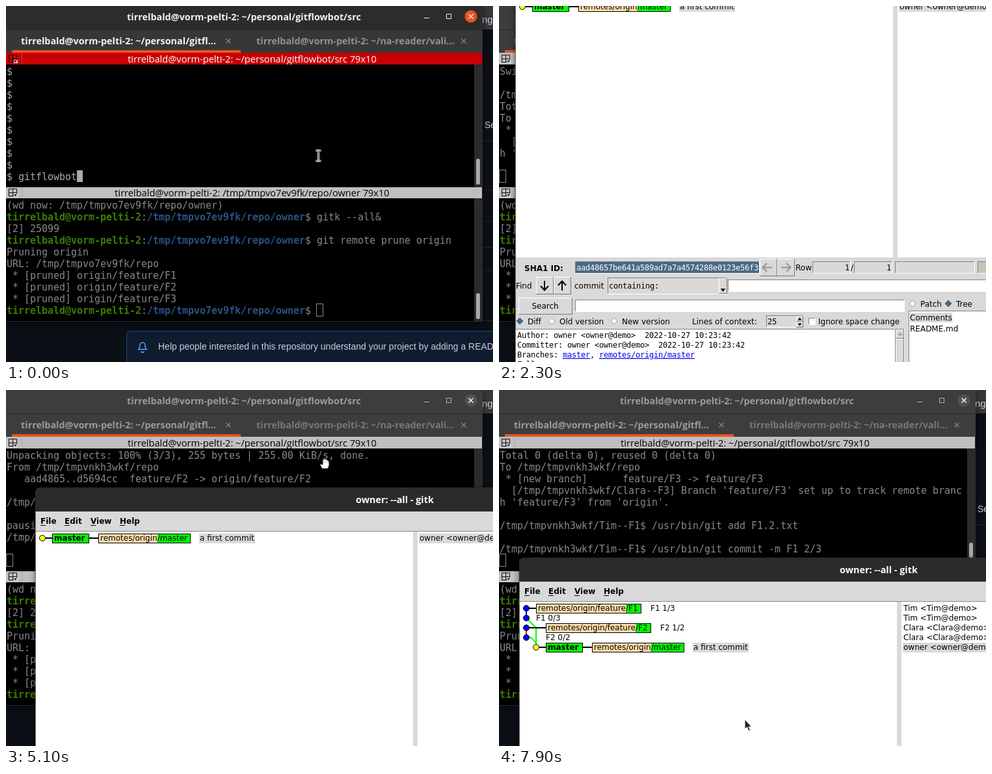
An HTML page for the animation above (8 s loop, 749 by 548 pixels).

```html
<!DOCTYPE html>
<html lang="en">
<head>
<meta charset="utf-8">
<title>Terminal and commit viewer</title>
<style>
html, body { margin: 0; width: 100%; height: 100%; overflow: hidden; background: #0b0f16; }
svg { display: block; }
text { white-space: pre; }
.mono { font: 15px "DejaVu Sans Mono", monospace; letter-spacing: -.0308px; fill: #888; }
.bar { font: 14.6px "Open Sans", sans-serif; text-anchor: middle; }
.cap { font: 700 14.4px "Open Sans", sans-serif; fill: #f2f2f0; }
.mid { text-anchor: middle; }
.web { font: 14px "Liberation Sans", Arial, sans-serif; fill: #c9d1d9; }
.ui { font: 12px "DejaVu Sans", sans-serif; fill: #000; }
.code { font: 12px "DejaVu Sans Mono", monospace; letter-spacing: -.224px; fill: #000; }
.b { font-weight: 700; }
.link { fill: #00e; text-decoration: underline; }
.shade { filter: drop-shadow(0 2px 5px rgba(0, 0, 0, .55)); }
#head { fill: #2c2c2c; }
#tabs { fill: #373737; }
#quit { fill: #e95420; }
.sign { stroke: #f2f2f0; fill: none; }
.off #head, .off #tabs { fill: #3d3d3d; }
.off #quit { fill: #515151; }
.off .cap { fill: #9b9b99; }
.cap.dim { fill: #929290; }
.off .cap.dim { fill: #787876; }
.off .sign { stroke: #b5b5b3; }
.off .sign.x { stroke: #fff; }
#topbar { fill: #c0bebf; }
.live #topbar { fill: #c80003; }
.live #topname { fill: #fff; }
.live .top { fill: #aaa; }
</style>
</head>
<body>
<svg id="stage" width="749" height="548" viewBox="0 0 749 548"></svg>
<script>
const USER = 'tirrelbald@vorm-pelti-2', BOSS = 'owner';
const GREY = '#d9d9d9', GREEN = '#00ff00', TAN = '#ffddaa', BLUE = '#0000ff';
const ROW = 18, TOP = 106, LOW = 312; // line height and first baselines

// Drawing helpers
const rect = (x, y, w, h, fill, more = '') =>
  `<rect x="${x}" y="${y}" width="${w}" height="${h}" fill="${fill}" ${more}/>`;
const text = (x, y, s, cls, more = '') =>
  `<text x="${x}" y="${y}" class="${cls}" ${more}>${s.replace(/</g, '&lt;')}</text>`;
const path = (d, stroke, width = 1, fill = 'none') =>
  `<path d="${d}" stroke="${stroke}" stroke-width="${width}" fill="${fill}"/>`;
const bevel = (x, y, w, h, lit, dark, fill) =>
  rect(x, y, w, h, dark) + rect(x, y, w - 1, h - 1, lit) + rect(x + 1, y + 1, w - 2, h - 2, fill);
const raised = (x, y, w, h) => bevel(x, y, w, h, '#fff', '#777', GREY);
const sunken = (x, y, w, h, fill = GREY) => bevel(x, y, w, h, '#828282', '#fff', fill);
const group = (id, body, more = '') => `<g id="${id}" ${more}>${body}</g>`;

function page() {
  const lines = [207, 283, 331, 371, 407, 484].map(y => rect(733, y, 16, 1, '#21262d')).join('');
  return rect(0, 0, 749, 548, '#0b0f16') + rect(733, 0, 16, 36, '#38383a') +
    rect(733, 95, 16, 390, '#0d1117') + lines +
    text(732, 26, 'ng', 'web', 'style="font-size:15px"') + text(736, 188, 'Se', 'web') +
    rect(185.5, 500.5, 600, 80, '#0f1c30', 'stroke="#1f4374" rx="5"') +
    path('M204 528.5c2-2 2-4 2-6a4 4.5 0 0 1 8 0c0 2 0 4 2 6zM208 531.5a2 2 0 0 0 4 0', '#58a6ff', 1.5) +
    text(234, 529, 'Help people interested in this repository understand your project by adding a README', 'web');
}

const paneIcon = y => path(`M4.5 ${y + 3.5}h12v11h-12zM10.5 ${y + 3.5}v11M4.5 ${y + 9.5}h12`, '#111') +
  rect(12, y + 11, 6, 5, '#ddd') + path(`M12 ${y + 12}h5l-2.5 3z`, 'none', 0, '#111') +
  rect(24, y + 1, 1, 16, '#999', 'opacity=".5"');

function prompt(row, cmd) {
  const span = (s, c) => `<tspan class="b" fill="${c}">${s}</tspan>`;
  return `<text class="mono" x="1" y="${LOW + row * ROW}">${span(USER, '#3e7b05')}:` +
    `${span('/tmp/tmpvo7ev9fk/repo/' + BOSS, '#2a5183')}$ ${cmd}</text>`;
}

function terminal() {
  const plain = (row, s) => text(1, LOW + row * ROW, s, 'mono');
  const rows = Array.from({ length: 10 }, (_, i) => text(1, TOP + i * ROW, '', 'mono top')).join('');
  const cross = x => path(`M${x - 3.5} 50.5l7 7m0 -7l-7 7`, '#85858a', 1.2);
  return rect(0, 0, 733, 486, '#2b2b2b') + '<rect id="head" width="733" height="36"/>' +
    text(366, 22, `${USER}: ~/personal/gitflowbot/src`, 'cap mid') +
    '<path class="sign" d="M643 18.5h8M677.5 12.5h7v7h-7z"/><circle id="quit" cx="715" cy="16" r="9.5"/>' +
    '<path class="sign x" stroke-width="1.4" d="M711.5 12.5l7 7m0 -7l-7 7"/>' +
    '<rect id="tabs" y="36" width="733" height="36"/>' + rect(0, 36, 733, 1, '#262626') +
    text(23, 59, `${USER}: ~/personal/gitfl…`, 'cap') + cross(342) +
    text(385, 59, `${USER}: ~/na-reader/vali…`, 'cap dim') + cross(704) +
    rect(9, 68, 352, 4, '#e95420') +
    '<rect id="topbar" y="72" width="732" height="18"/>' + paneIcon(72) +
    text(378.5, 87, `${USER}: ~/personal/gitflowbot/src 79x10`, 'bar', 'id="topname"') +
    rect(0, 90, 720, 189, '#000') + rect(723, 235, 6, 40, '#a9a9a6', 'rx="3"') +
    rect(0, 279, 732, 17, '#c0bebf') + paneIcon(278) +
    text(378.5, 293, `${USER}: /tmp/tmpvo7ev9fk/repo/${BOSS} 79x10`, 'bar') +
    rect(0, 296, 720, 189, '#000') + rect(723, 442, 6, 40, '#a9a9a6', 'rx="3"') +
    plain(0, `(wd now: /tmp/tmpvo7ev9fk/repo/${BOSS})`) + prompt(1, 'gitk --all&amp;') + plain(2, '[2] 25099') +
    prompt(3, 'git remote prune origin') + plain(4, 'Pruning origin') + plain(5, 'URL: /tmp/tmpvo7ev9fk/repo') +
    [1, 2, 3].map(n => plain(5 + n, ` * [pruned] origin/feature/F${n}`)).join('') + prompt(9, '') +
    rect(477.5, 458.5, 10, 19, 'none', 'stroke="#888"') +
    group('rows', rows) + rect(109, 253, 9, 18, '#aaa', 'id="block"') +
    rect(.5, 252.5, 10, 19, 'none', 'id="hollow" stroke="#888"');
}

// Commit graph
const dot = (x, y, fill) => `<circle cx="${x}" cy="${y}" r="4.5" fill="${fill}" stroke="#000"/>`;
const link = (x, y, to) => path(`M${x} ${y}H${to}`, '#000', 2);
const frame = (x, y, w, fill) => rect(x + .5, y - 6.5, w - 1, 14, fill, 'stroke="#000"');
const note = (x, y, s) => text(x, y + 4, s, 'ui');
const author = (y, who) => note(591, y, `${who} <${who}@demo>`);

function remote(x, y, dir, name, split, w) {
  return frame(x, y, w, GREEN) + rect(x + 1, y - 6, split + 2, 13, TAN) +
    note(x + 3, y, `remotes/${dir}/${name}`);
}
function feature(x, y, n, msg) {
  return link(11, y, x) + remote(x, y, 'origin/feature', 'F' + n, 135.5, 162) + note(x + 176, y, msg);
}
function root(x, y) {
  return link(x, y, x + 15) + frame(x + 15, y, 57, GREEN) + text(x + 18, y + 4, 'master', 'ui b') +
    link(x + 72, y, x + 86) + remote(x + 86, y, 'origin', 'master', 88, 142) +
    rect(x + 241, y - 7, 86, 15, GREY) + note(x + 242, y, 'a first commit') + dot(x, y, '#ffff00') +
    rect(590, y - 7, 515, 15, GREY) + author(y, BOSS);
}
function history() {
  const dots = [78, 93, 108, 123].map(y => dot(11, y, BLUE)).join('');
  return path('M11 93L26 108V138M11 123H18L26 131', GREEN, 2) + path('M11 78V93', BLUE, 2) +
    path('M11 108V123', '#f00', 2) +
    feature(26, 78, 1, 'F1 1/3') + note(26, 93, 'F1 0/3') +
    feature(41, 108, 2, 'F2 1/2') + note(41, 123, 'F2 0/2') + dots + root(26, 138) +
    author(78, 'Tim') + author(93, 'Tim') + author(108, 'Clara') + author(123, 'Clara');
}

function details() {
  const diamond = (x, y, on) => path(`M${x - 5} ${y}l5 -5l5 5l-5 5z`, on ? '#3b566e' : '#999', 1, on ? '#4a6984' : '#fff');
  const ui = (x, y, s, more = '') => text(x, y, s, 'ui ' + more);
  const code = (x, y, s, more = '') => text(x, y, s, 'code ' + more);
  return ui(39, 408, 'SHA1 ID:', 'b') + sunken(117, 393, 284, 19, '#4a6984') +
    text(119, 407, 'aad48657be641a589ad7a7a4574288e0123e56f3', 'code', 'style="fill:#fff"') +
    raised(401, 389, 27, 27) + path('M420 402.5H406M412 396l-6.5 6.5l6.5 6.5', '#949494', 2) +
    raised(428, 389, 27, 27) + path('M434 402.5H448M442 396l6.5 6.5l-6.5 6.5', '#949494', 2) +
    ui(456, 407, 'Row') + sunken(482, 393, 59, 19) + code(532, 407, '1') + ui(541, 407, '/') +
    sunken(546, 393, 59, 19) + code(596, 407, '1') + sunken(609, 393, 123, 19) + sunken(736, 393, 80, 19, '#c6c6b6') +
    ui(26, 435, 'Find') + raised(57, 417, 27, 27) + path('M70 423v14M64 431l6 6.5l6 -6.5', '#000', 2) +
    raised(84, 417, 27, 27) + path('M97 438v-14M91 430l6 -6.5l6 6.5', '#000', 2) + ui(116, 435, 'commit') +
    sunken(167, 418, 184, 26) + code(169, 435, 'containing:') + raised(338, 419, 13, 24) +
    path('M341 435h7l-3.5 5z', 'none', 0, '#000') + sunken(352, 421, 500, 19, '#fff') +
    raised(30, 449, 83, 26) + ui(71, 466, 'Search', 'mid') + sunken(117, 452, 507, 19, '#fff') +
    diamond(32, 485, 1) + ui(44, 490, 'Diff') + diamond(81, 485) + ui(93, 490, 'Old version') +
    diamond(177, 485) + ui(189, 490, 'New version') + ui(297, 490, 'Lines of context:') +
    sunken(411, 476, 57, 19) + code(413, 490, '25') + raised(457, 477, 11, 9) + raised(457, 486, 11, 9) +
    path('M459.5 483.5h6l-3 -4zM459.5 488.5h6l-3 4z', 'none', 0, '#000') +
    sunken(476, 480, 11, 11, '#fff') + ui(491, 490, 'Ignore space change') + rect(618, 478, 12, 16, GREY) +
    sunken(25, 497, 584, 120, '#fff') + sunken(609, 497, 15, 120, '#c3c3c3') + raised(610, 498, 13, 14) +
    path('M613 507h8l-4 -5z', 'none', 0, '#a3a3a3') + raised(610, 512, 13, 100) +
    code(28, 511, `Author: ${BOSS} <${BOSS}@demo>  2022-10-27 10:23:42`) +
    code(28, 526, `Committer: ${BOSS} <${BOSS}@demo>  2022-10-27 10:23:42`) +
    code(28, 541, 'Branches:') + code(98, 541, 'master', 'link') + code(140, 541, ',') +
    code(154, 541, 'remotes/origin/master', 'link') + code(28, 556, 'Follows: ') +
    diamond(636, 458) + ui(648, 463, 'Patch') + diamond(691, 458, 1) + ui(703, 463, 'Tree') +
    sunken(630, 469, 400, 150, '#fff') + rect(632, 472, 65, 15, GREY) + ui(632, 484, 'Comments') + ui(632, 501, 'README.md');
}

function viewer() {
  const menu = ['File', 'Edit', 'View', 'Help'].map((s, i) => {
    const x = [8, 45, 85, 130][i];
    return text(x, 56, s, 'ui b') + rect(x, 58, 8, 1, '#000');
  }).join('');
  const panes = rect(0, 67, 1106, 1, '#8a8a8a') + rect(1, 68, 580, 396, '#fff') + rect(588, 68, 517, 396, '#fff') + menu;
  return path('M0 700V8Q0 0 8 0H1098Q1106 0 1106 8V700z', 'none', 0, '#2b2b2b') + rect(0, 37, 1106, 663, GREY) +
    rect(0, 37, 1, 663, '#777') + text(553, 24, `${BOSS}: --all - gitk`, 'cap mid', 'style="fill:#fff"') +
    group('panes', panes + group('single', root(11, 78)) + group('many', history()) +
      group('details', details(), 'transform="translate(-25 77)"'));
}

const bar = 'M-4 -8h3l1 1l1 -1h3M0 -7V7M-4 8h3l1 -1l1 1h3';
const pointers = group('beam', path(bar, '#fff', 3) + path(bar, '#111'), 'transform="translate(480.5 230.5)"') +
  group('arrow', path('M0 0V15L3.5 12L6 18L8.5 17L6 11.5H10.5Z', '#fff', 1, '#222')) +
  group('hand', path('M-4 8L-7 2Q-7 0 -5 1L-3 2V-6Q-2 -8 -1 -6Q1 -8 2 -6Q4 -7 5 -4Q7 -5 7 -2V3L5 8Z', '#222', 1, '#fff') +
    path('M-1 -5v4M2 -5v4M5 -3v3', '#999', .7));

document.getElementById('stage').innerHTML = page() +
  group('term', terminal(), 'class="shade"') + group('win', viewer(), 'class="shade"') + pointers;

const [term, win, rows, block, hollow, panes, info, single, many, beam, arrow, hand] =
  ['term', 'win', 'rows', 'block', 'hollow', 'panes', 'details', 'single', 'many', 'beam', 'arrow', 'hand']
    .map(id => document.getElementById(id));

// Scrollback, with the length it has at each moment
const log = [...Array(9).fill('$'), '$ gitflowbot'], ends = [[0, 9], [1300, 10]];
const tmp = '/tmp/tmpvnkh3wkf', home = `${tmp}/repo/${BOSS}`, git = '$ /usr/bin/git ';
const out = (...lines) => lines.forEach(s => log.push(...(s.match(/.{1,79}/g) || [''])));
const at = time => ends.push([time, log.length]);
const clone = (who, f) => `${tmp}/${who}--${f}`;
const start = (who, f) => out(clone(who, f) + git + `checkout -b feature/${f}`, `Switched to a new branch 'feature/${f}'`, '');
const publish = (who, f) => out(clone(who, f) + git + `push --set-upstream origin feature/${f}`,
  'Total 0 (delta 0), reused 0 (delta 0)', `To ${tmp}/repo`, ` * [new branch]      feature/${f} -> feature/${f}`,
  `  [${clone(who, f)}] Branch 'feature/${f}' set up to track remote branch 'feature/${f}' from 'origin'.`, '');
const commit = (who, f, n, msg) => out(clone(who, f) + git + `add ${f}.${n}.txt`, '', clone(who, f) + git + `commit -m ${msg}`);
const saved = (f, msg) => out(`[feature/${f} d5694cc] ${msg}`, ' 1 file changed, 1 insertion(+)', '');
const push = (who, f, range) => out(clone(who, f) + git + 'push', `To ${tmp}/repo`, `   ${range}  feature/${f} -> feature/${f}`, '');
const prune = () => out(`${home}${git}remote prune origin`, '');
const fetchAll = () => out(`pausing; update ${home}`, `${home}${git}fetch`, '');

start('Tim', 'F1'); publish('Tim', 'F1'); at(1600);
start('Clara', 'F2'); publish('Clara', 'F2'); at(1700);
commit('Clara', 'F2', 0, 'F2 0/2'); at(3500);
saved('F2', 'F2 0/2'); at(3600);
push('Clara', 'F2', 'aad4865..d5694cc'); at(3700);
out('Unpacking objects: 100% (3/3), 255 bytes | 255.00 KiB/s, done.', `From ${tmp}/repo`,
  '   aad4865..d5694cc  feature/F2 -> origin/feature/F2', '');
prune(); fetchAll(); at(3800);
commit('Clara', 'F2', 1, 'F2 1/2'); at(5800);
saved('F2', 'F2 1/2'); at(5900);
push('Clara', 'F2', 'd5694cc..7be20a1'); at(6000);
prune(); at(6100);
fetchAll(); at(6200);
out(`From ${tmp}/repo`, '   d5694cc..7be20a1  feature/F2 -> origin/feature/F2', ''); at(6900);
start('Clara', 'F3'); at(7100);
publish('Clara', 'F3'); at(7300);
commit('Tim', 'F1', 2, 'F1 2/3'); at(7900);

// Motion: [time, x, y] keys, linear between
const winKeys = [[3100, 25, -77], [3500, 22, 93], [5000, 22, 93], [5100, 45, 150], [5200, 31, 208], [5300, 31, 208], [5500, 31, 258]];
const ptrKeys = [[4100, 422, 363], [4900, 492, 126], [5000, 492, 126], [5100, 490, 113], [5200, 499, 228], [5300, 499, 228],
  [5500, 499, 278], [5600, 499, 278], [5800, 395, 399], [6200, 384, 404], [6500, 384, 404], [6700, 339, 445], [6800, 339, 445],
  [7300, 380, 512], [7500, 378, 507]];

function place(keys, t) {
  const i = keys.findIndex(k => k[0] > t);
  if (i < 1) return (i < 0 ? keys[keys.length - 1] : keys[0]).slice(1);
  const [a, b] = [keys[i - 1], keys[i]], p = (t - a[0]) / (b[0] - a[0]);
  return [1, 2].map(n => Math.round(a[n] + (b[n] - a[n]) * p));
}
const show = (node, on) => node.setAttribute('visibility', on ? 'inherit' : 'hidden');
const move = (node, [x, y]) => node.setAttribute('transform', `translate(${x} ${y})`);

let last = -1;
function draw(t) {
  if (t === last) return;
  last = t;
  const live = t < 1900, typing = t < 1300;
  term.setAttribute('class', `shade ${live ? 'live' : ''} ${t >= 2000 ? 'off' : ''}`);

  const end = ends.filter(e => e[0] <= t).pop()[1];
  const lines = log.slice(end - 9, end + (typing ? 1 : 0));
  [...rows.children].forEach((row, i) => { row.textContent = lines[i] || ''; });
  block.setAttribute('x', typing ? 109 : 1);
  show(block, live && !(t >= 300 && t < 900));
  show(hollow, !live);

  show(win, t >= 2000);
  win.setAttribute('opacity', t < 2100 ? .5 : 1);
  move(win, place(winKeys, t));
  show(panes, t >= 2200);
  show(info, t >= 2300);
  show(single, t >= 2300 && t < 6000);
  show(many, t >= 6000);

  const drag = t >= 5100 && t < 5700, spot = place(ptrKeys, t);
  show(beam, typing);
  show(hand, drag);
  move(hand, spot);
  show(arrow, t >= 4100 && !drag);
  move(arrow, spot);
}

// A hidden parent hides its parts only while they inherit from it
function tick(now) {
  draw(Math.floor(now % 8000 / 100) * 100);
  requestAnimationFrame(tick);
}
draw(0);
requestAnimationFrame(tick);
</script>
</body>
</html>
```
